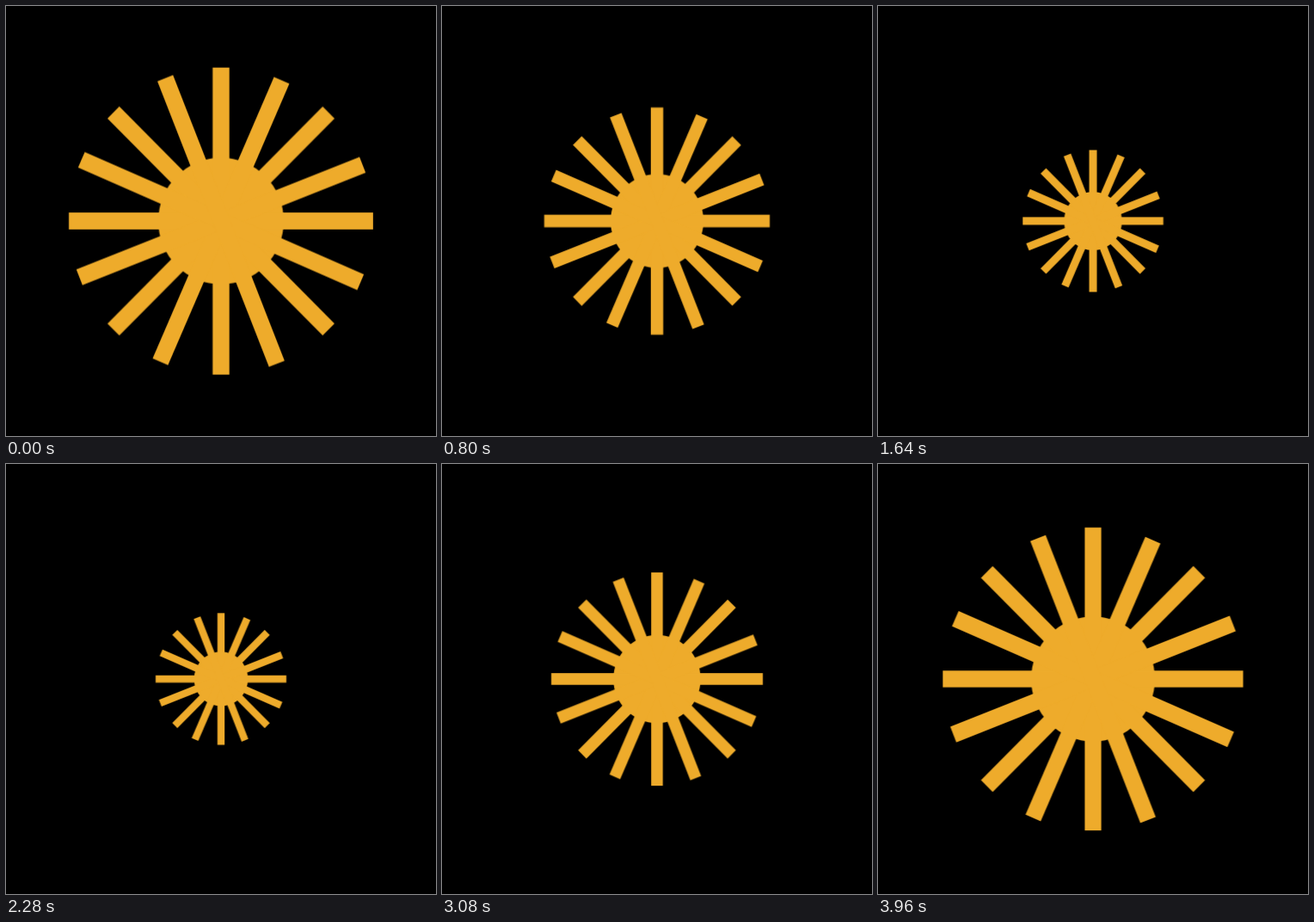
Animation, 500 px wide and 500 px high, one loop 4000 ms. Source, as an HTML page:

```html
<!DOCTYPE html>
<html lang="en">
<head>
<meta charset="utf-8">
<title>Pulsing sun</title>
<style>
  html, body { margin: 0; width: 100%; height: 100%; overflow: hidden; background: #000; }
  svg { display: block; width: 100%; height: 100%; }
  .sun {
    fill: #eeab2b;
    stroke: none;
    animation: pulse 4s linear -3.99s infinite;
  }
  .beams { stroke: #eeab2b; stroke-width: 19.7; }
  @keyframes pulse {
    0%, 100% { transform: scale(1); }
    50% { transform: scale(.3385); }
  }
</style>
</head>
<body>
<svg viewBox="-250 -250 500 500">
  <defs>
    <path id="beam" d="M0-179V179"/>
    <g id="cross">
      <use href="#beam"/>
      <use href="#beam" transform="rotate(45)"/>
      <use href="#beam" transform="rotate(90)"/>
      <use href="#beam" transform="rotate(135)"/>
    </g>
  </defs>
  <g class="sun">
    <g transform="scale(.9915 1)">
      <circle r="73.8"/>
      <g class="beams">
        <use href="#cross"/>
        <use href="#cross" transform="rotate(23.5)"/>
      </g>
    </g>
  </g>
</svg>
</body>
</html>
```
